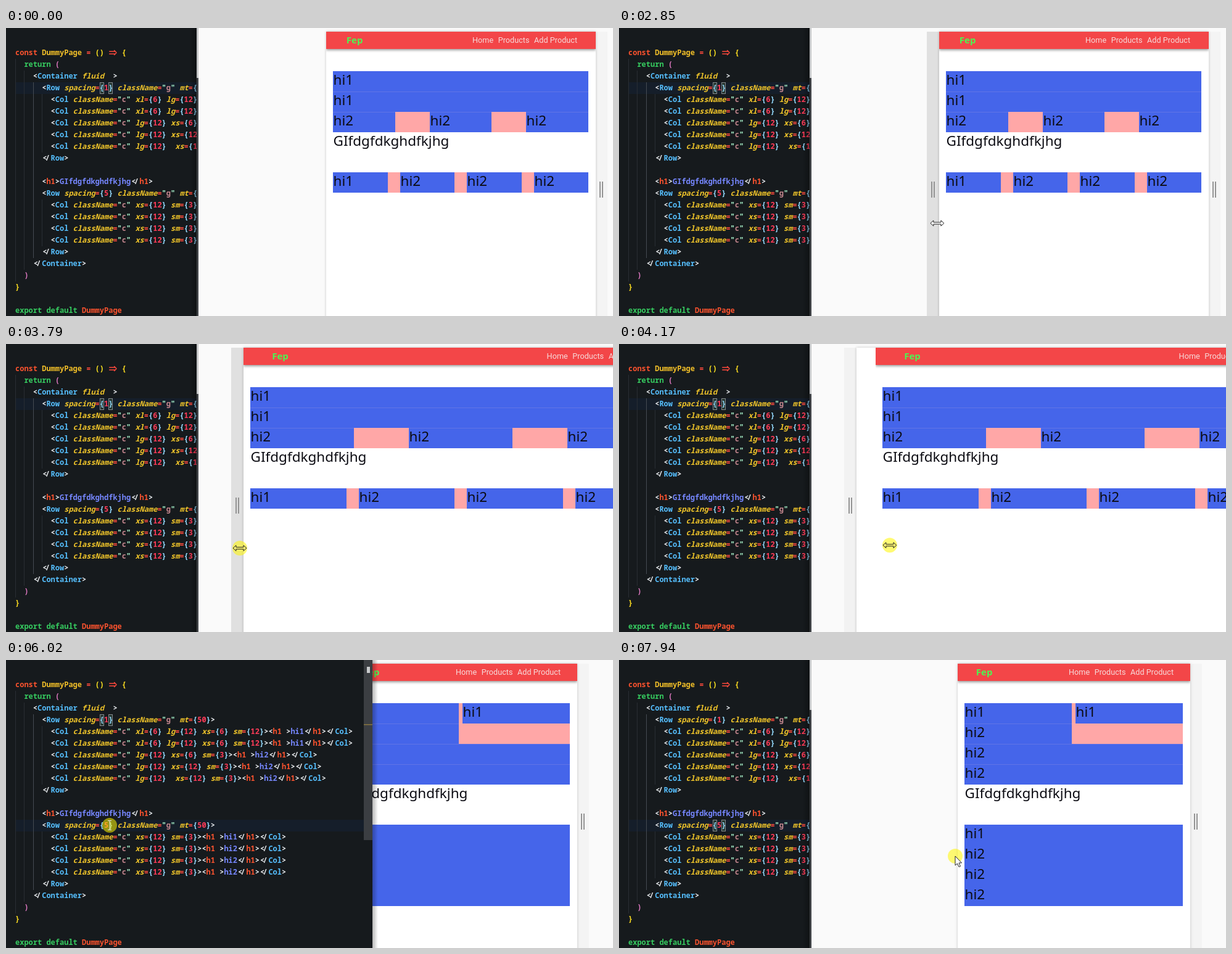
Animation, 984 px wide and 467 px high, one loop 8 s. Source, as an HTML page with a canvas:

```html
<!DOCTYPE html>
<html lang="en">
<head>
<meta charset="utf-8">
<title>Responsive grid demo</title>
<style>
html, body { margin: 0; width: 100%; height: 100%; overflow: hidden; background: #fafafa; }
canvas { display: block; }
</style>
</head>
<body>
<canvas id="stage" width="984" height="467"></canvas>
<script>
const ctx = document.getElementById('stage').getContext('2d', { alpha: false });
const LOOP = 8000, STEP = 77.5, PHASE = 3070;
const CHAR = 7.2, LINE = 19, LEFT = 15, MIRROR = 1475;
const BLUE = '#4565ea', PINK = '#ffa7a7';
const PAGE_FONT = '22.5px "Noto Sans", sans-serif';

const col = (attrs, text) => `        <Col className="c" ${attrs}><h1 >${text}</h1></Col>`;
const code = [
  'const DummyPage = () => {',
  '  return (',
  '    <Container fluid  >',
  '      <Row spacing={1} className="g" mt={50}>',
  col('xl={6} lg={12} xs={6} sm={12}', 'hi1'),
  col('xl={6} lg={12} xs={6} sm={12}', 'hi1'),
  col('lg={12} xs={6} sm={3}', 'hi2'),
  col('lg={12} xs={12} sm={3}', 'hi2'),
  col('lg={12}  xs={12} sm={3}', 'hi2'),
  '      </Row>',
  '',
  '      <h1>GIfdgfdkghdfkjhg</h1>',
  '      <Row spacing={5} className="g" mt={50}>',
  ...['hi1', 'hi2', 'hi2', 'hi2'].map(text => col('xs={12} sm={3}', text)),
  '      </Row>',
  '    </Container>',
  '  )',
  '}',
  '',
  'export default DummyPage'
];

// Places where the pointer turns or rests: [time, x, y].
const pointerPath = [
  [190, 370, 453], [970, 158, 273], [1440, 163, 270], [2240, 720, 212], [2840, 515, 317],
  [3070, 515, 317], [3640, 379, 331], [3890, 379, 331], [4620, 544, 318], [5000, 546, 318],
  [5860, 168, 268], [6090, 168, 268], [6390, 570, 285], [6720, 570, 285], [7500, 545, 318]
];

function at(path, t) {
  const i = path.findIndex(key => key[0] > t);
  if (i < 0) return path[path.length - 1].slice(1);
  if (i === 0) return path[0].slice(1);
  const a = path[i - 1], b = path[i], p = (t - a[0]) / (b[0] - a[0]);
  return a.slice(1).map((v, j) => v + (b[j + 1] - v) * p);
}
// Left edge while the page is pulled wide and, from `back` on, narrow again.
const dragged = (t, back) => at([[3070, 519], [3680, 385], [back, 385], [4640, 549]], t)[0];
const between = (t, a, b) => t >= a && t < b;

function rect(x, y, w, h, color) {
  ctx.fillStyle = color;
  ctx.fillRect(x, y, w, h);
}
function label(text, x, y, font, color) {
  ctx.font = font;
  ctx.fillStyle = color;
  ctx.fillText(text, x, y);
}
function fade(x0, x1, from, to) {
  const g = ctx.createLinearGradient(x0, 0, x1, 0);
  g.addColorStop(0, `rgba(0,0,0,${from})`);
  g.addColorStop(1, `rgba(0,0,0,${to})`);
  rect(x0, 0, x1 - x0, 467, g);
}
function raised(x, y, w, h, color, alpha, drop) {
  ctx.save();
  ctx.shadowColor = `rgba(0,0,0,${alpha})`;
  ctx.shadowBlur = 4;
  ctx.shadowOffsetY = drop;
  rect(x, y, w, h, color);
  ctx.restore();
}
function clipped(x, w, draw) {
  ctx.save();
  ctx.beginPath();
  ctx.rect(x, 0, w, 467);
  ctx.clip();
  draw();
  ctx.restore();
}
function shape(points, x, y, fill) {
  ctx.beginPath();
  points.forEach(([dx, dy]) => ctx.lineTo(x + dx, y + dy));
  ctx.closePath();
  ctx.fillStyle = fill;
  ctx.fill();
  ctx.strokeStyle = '#222';
  ctx.lineWidth = 1;
  ctx.stroke();
}

// ---- code editor ----
const attribute = /^(fluid|spacing|className|xl|lg|xs|sm|mt)$/;
const tokenRules = [
  [attribute, '#efc42a'],
  [/^(return|export|default)$/, '#36cc60'],
  [/^(Row|Col|Container)$/, '#55bdfb'],
  [/^(const|h1)$/, '#f9522e'],
  [/^[cg]$/, '#c4868e'],
  [/^\d+$/, '#ff3b58'],
  [/^\w/, '#7687ff'],
  [/^=/, '#ff4a3d'],
  [/^"/, '#a5eec8'],
  [/./, '#eceff2']
];

function tokenColor(token, row) {
  const outer = row === 0 || row === 20;
  if (token === 'DummyPage') return row ? '#f9522e' : '#f0be28';
  if (/[{}]/.test(token)) return outer ? '#ffdf20' : '#95dcff';
  if (/[()]/.test(token)) return outer ? '#ffe620' : '#de78c0';
  return tokenRules.find(([pattern]) => pattern.test(token))[1];
}

function drawArrow(x, y, color) {
  ctx.strokeStyle = color;
  ctx.lineWidth = 1.4;
  ctx.beginPath();
  for (const d of [-2, 2]) {
    ctx.moveTo(x + 1, y + d);
    ctx.lineTo(x + 11, y + d);
    ctx.moveTo(x + 9, y + d * 2);
    ctx.lineTo(x + 13, y);
  }
  ctx.stroke();
}

function drawLine(line, row) {
  const y = 40 + row * LINE;
  const indent = (line || code[row + 1]).search(/\S/);
  for (let i = 0; i < indent; i += 2) {
    rect(Math.round(LEFT + i * CHAR), y - 9, 1, LINE, i === 4 ? '#454b52' : '#292e33');
  }
  for (const { 0: token, index } of line.matchAll(/<\/|=>|\w+|\S/g)) {
    const x = LEFT + index * CHAR, color = tokenColor(token, row);
    const font = `${attribute.test(token) ? 'italic ' : ''}600 12px "Noto Sans Mono", monospace`;
    if (token === '=>') drawArrow(x, y, color);
    else if (token === '</') {
      label('<', x + 1, y + 4, font, color);
      label('/', x + 5.5, y + 4, font, color);
    } else label(token, x, y + 4, font, color);
  }
}

function drawEditor(t, front) {
  const edge = front ? 594 : 312;
  const activeRow = t < 6015 ? 3 : 12, bracketRow = t < 6090 ? 3 : 12;
  clipped(0, edge, () => {
    rect(0, 0, edge, 467, '#161a1d');
    rect(LEFT, 31 + activeRow * LINE, edge - LEFT, LINE, '#151e2a');
    for (const index of [19, 21]) {
      const x = Math.round(LEFT + index * CHAR) + .5, y = 31.5 + bracketRow * LINE;
      rect(x, y, 6, 18, '#25352f');
      ctx.lineWidth = 1;
      ctx.strokeStyle = '#858a8e';
      ctx.strokeRect(x, y, 6, 18);
    }
    code.forEach(drawLine);
    if (between(t, 6090, 6580)) rect(166, 260, 1, 18, '#d8dde2');
    if (front) {
      rect(580, 0, 14, 292, '#3b3e42');
      rect(585, 11, 5, 10, '#c9cbcd');
      rect(580, 104, 14, 1.5, '#8a7640');
    } else {
      fade(298, 310, 0, .35);
      rect(309, 0, 3, 467, '#3e4145');
      rect(309, 0, 3, 81, '#c4c6c8');
    }
  });
  if (front) fade(594, 603, .28, 0);
}

// ---- browser page ----
function cell(x, y, w, text) {
  const x0 = Math.round(x);
  rect(x0, y, Math.round(x + w) - x0, 33, BLUE);
  label(text, x0 + .5, y + 22, PAGE_FONT, '#0b0b12');
}
function spread(x, y, w, size, texts) {
  texts.forEach((text, i) => cell(x + i * (w - size) / (texts.length - 1), y, size, text));
}

function drawHeader(left, width) {
  raised(left, 6, width, 28, '#f34648', .4, 1.5);
  label('Fep', left + 11 + width * .05, 25, 'bold 15px "Noto Sans", sans-serif', '#4cf552');
  let x = left + width * .95 - 8;
  for (const text of ['Add Product', 'Products', 'Home']) {
    ctx.font = '12.7px Roboto, sans-serif';
    x -= ctx.measureText(text).width;
    label(text, x, 24, ctx.font, '#f6dada');
    x -= 7.5;
  }
}

function drawContent(left, width) {
  const x = Math.round(left + 11), w = width - 23, half = w / 2 - 3;
  const wide = width > 420, end = wide ? 169 : 202;
  const texts = ['hi1', 'hi2', 'hi2', 'hi2'];

  drawHeader(left, width);
  rect(x, 70, w, end - 70, PINK);
  if (wide) {
    cell(x, 70, w, 'hi1');
    cell(x, 103, w, 'hi1');
    spread(x, 136, w, w / 4 - 2.8, ['hi2', 'hi2', 'hi2']);
  } else {
    spread(x, 70, w, half, ['hi1', 'hi1']);
    cell(x, 103, half, 'hi2');
    cell(x, 136, w, 'hi2');
    cell(x, 169, w, 'hi2');
  }
  for (let y = 103; y < end; y += 33) rect(x, y, w, 1, 'rgba(255,200,210,.15)');
  label('GIfdgfdkghdfkjhg', x + .5, end + 22, PAGE_FONT, '#0b0b12');

  const top = end + 65;
  if (wide) {
    rect(x, top, w, 33, PINK);
    spread(x, top, w, (w - 60) / 4, texts);
  } else texts.forEach((text, i) => cell(x, top + i * 33, w, text));
}

function grip(x) {
  for (const dx of [0, 4]) rect(Math.round(x) + dx, 249, 2, 26, '#949494');
}

function drawBrowser(t, step) {
  const left = Math.round(dragged(step, 4040)), frame = Math.round(dragged(step, 4160));
  const right = MIRROR - frame, start = Math.min(frame, left), end = MIRROR - left;
  const hover = between(t, 2770, 3940) || between(t, 7570, 7720);

  rect(312, 0, 672, 467, '#fafafa');
  rect(right, 6, 19, 461, '#f4f4f4');
  if (hover || between(t, 3940, 4300)) {
    rect(frame - 20, 6, 20, 461, hover ? '#e0e0e0' : '#f2f2f2');
    grip(frame - 13);
  }
  raised(start, 6, Math.max(end, right) - start, 480, '#fff', .22, 0);
  clipped(left, Math.max(end, right) - left, () => drawContent(left, MIRROR - 2 * frame));
  grip(right + 6);
}

// ---- pointer ----
const arrow = [[0, 0], [0, 15], [3.5, 12], [6, 17.5], [8.5, 16.5], [6, 11], [10.5, 11]];
const halfResize = [[-11, 0], [-6, -4.5], [-6, -1.5], [6, -1.5], [6, -4.5], [11, 0]];
const resize = halfResize.concat(halfResize.map(([x, y]) => [-x, -y]));

function drawPointer(t, step, front) {
  if (t < 190) return;
  const [x, y] = at(pointerPath, step);
  const pressed = between(t, 3070, 5000) || between(t, 6010, 6150) || t >= 7865;
  if (pressed) {
    ctx.fillStyle = 'rgba(255,245,0,.55)';
    ctx.beginPath();
    ctx.arc(x, y, 12, 0, Math.PI * 2);
    ctx.fill();
  }
  if (between(t, 2770, 5060) || between(t, 7570, 7865)) {
    shape(resize, x, y, pressed ? '#f6ef70' : '#fff');
  } else if (x < (front ? 594 : 312)) {
    rect(x - .5, y - 8, 1, 16, '#e4e4e4');
    for (const dy of [-8, 7]) rect(x - 3, y + dy, 6, 1, '#e4e4e4');
  } else shape(arrow, x, y, '#fff');
}

function draw() {
  const t = performance.now() % LOOP;
  const step = PHASE + Math.floor((t - PHASE) / STEP) * STEP;
  const front = between(t, 6015, 6960);
  drawBrowser(t, step);
  drawEditor(t, front);
  drawPointer(t, step, front);
  requestAnimationFrame(draw);
}
draw();
</script>
</body>
</html>
```
